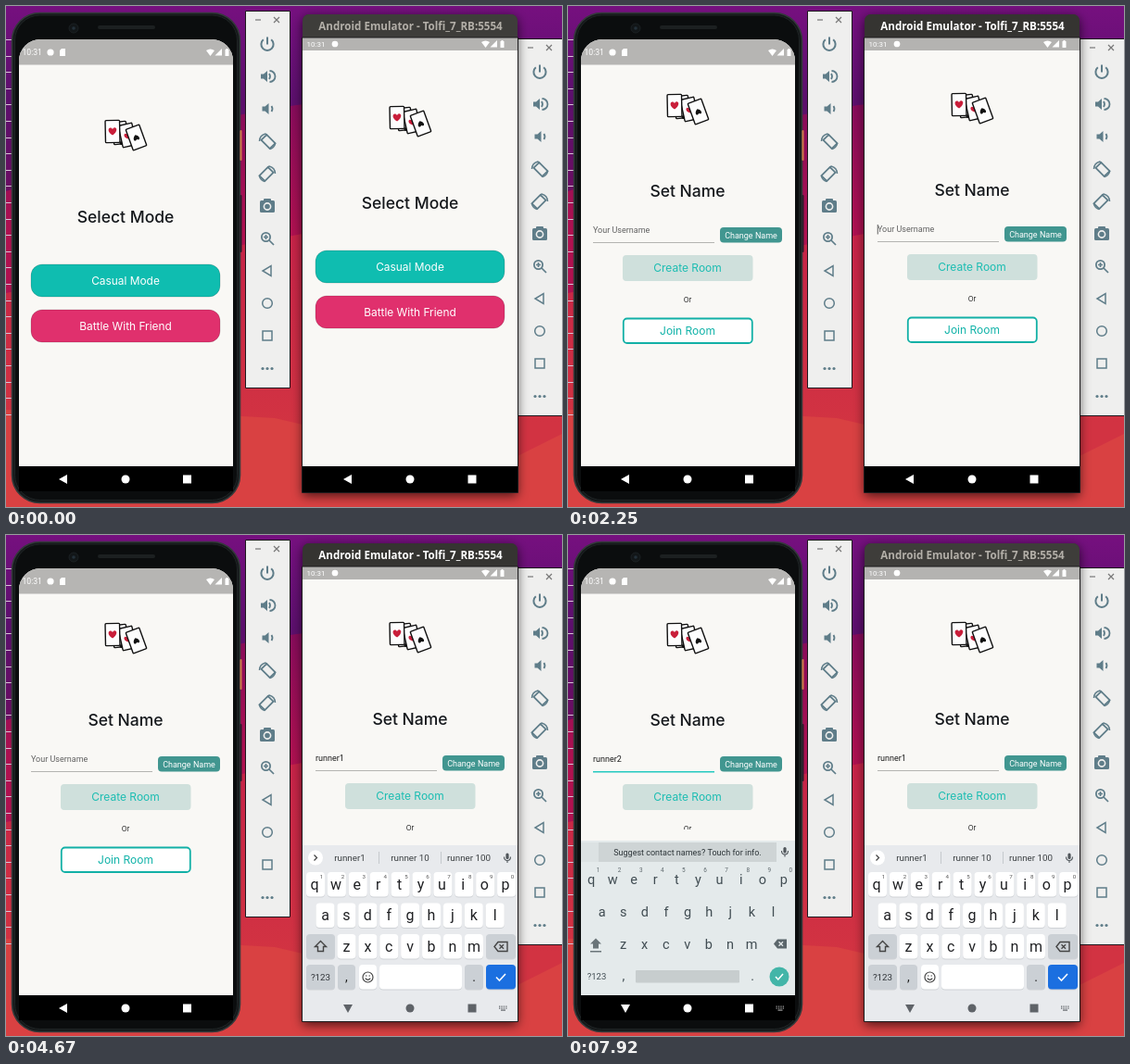
An HTML page with a canvas for the animation above (8 s loop, 600 px wide and 541 px high).

```html
<!DOCTYPE html>
<html lang="en">
<head>
<meta charset="utf-8">
<title>Card game on two emulators</title>
<style>
  html, body { margin: 0; width: 100%; height: 100%; overflow: hidden; background: #5d1070; }
  canvas { display: block; width: 100vw; height: 100vh; }
</style>
</head>
<body>
<canvas id="stage"></canvas>
<script>
const W = 600, H = 541, LOOP = 8000, STEP = 1000 / 12;
const canvas = document.getElementById('stage');
const c = canvas.getContext('2d');
const TEAL = '#0fbdb0', SLATE = '#5f7d89', PAGE = '#f9f8f5';
const DISPLAY = 'Inter, sans-serif', BODY = 'Roboto, sans-serif';
const ROWS = ['qwertyuiop', 'asdfghjkl', 'zxcvbnm'];

const clamp = v => Math.max(0, Math.min(1, v));
const between = (t, a, b) => t >= a && t < b;

// Cubic Bezier easing, solved by bisection.
function bezier(x1, y1, x2, y2) {
  const at = (a, b, s) => 3 * (1 - s) ** 2 * s * a + 3 * (1 - s) * s * s * b + s ** 3;
  return x => {
    if (x <= 0 || x >= 1) return clamp(x);
    let lo = 0, hi = 1;
    for (let i = 0; i < 24; i++) {
      const mid = (lo + hi) / 2;
      if (at(x1, x2, mid) < x) lo = mid; else hi = mid;
    }
    return at(y1, y2, lo);
  };
}
const easePage = bezier(0.35, 0.91, 0.33, 0.97);
const easeOut = bezier(0, 0, 0.2, 1);

function rect(x, y, w, h, fill, r = 0, stroke, lw = 1) {
  c.beginPath();
  c.roundRect(x, y, w, h, r);
  if (fill) { c.fillStyle = fill; c.fill(); }
  if (stroke) { c.strokeStyle = stroke; c.lineWidth = lw; c.stroke(); }
}
function disc(x, y, r, fill, stroke, lw = 1) {
  c.beginPath();
  c.arc(x, y, r, 0, 7);
  if (fill) { c.fillStyle = fill; c.fill(); }
  if (stroke) { c.strokeStyle = stroke; c.lineWidth = lw; c.stroke(); }
}
function text(s, x, y, size, color, { font = BODY, weight = 400, align = 'center' } = {}) {
  c.font = `${weight} ${size}px ${font}`;
  c.textAlign = align;
  c.fillStyle = color;
  c.fillText(s, x, y);
}
function at(x, y, draw, angle = 0) {
  c.save();
  c.translate(x, y);
  c.rotate(angle);
  draw();
  c.restore();
}
function clipped(x, y, w, h, draw, r = 0) {
  c.save();
  c.beginPath();
  c.roundRect(x, y, w, h, r);
  c.clip();
  draw();
  c.restore();
}
// Path centred on (x, y); stroked when a line width is given.
function icon(d, x, y, color, lw, angle = 0) {
  at(x, y, () => {
    const p = new Path2D(d);
    if (lw) { c.strokeStyle = color; c.lineWidth = lw; c.stroke(p); }
    else { c.fillStyle = color; c.fill(p); }
  }, angle);
}
function poly(points, fill) {
  c.beginPath();
  points.forEach(([x, y]) => c.lineTo(x, y));
  c.fillStyle = fill;
  c.fill();
}
function gradient(y0, y1, ...colors) {
  const g = c.createLinearGradient(0, y0, 0, y1);
  colors.forEach((color, i) => g.addColorStop(i / (colors.length - 1), color));
  return g;
}

function drawBackground() {
  rect(0, 0, W, H, gradient(0, 200, '#76107f', '#5c0f6d', '#6a0d62'));
  poly([[0, 200], [250, 118], [313, 107], [W, 80], [W, H], [0, H]],
    gradient(105, 250, '#860b5b', '#b01150'));
  poly([[0, 310], [255, 258], [320, 246], [W, 230], [W, H], [0, H]],
    gradient(250, 450, '#c62348', '#d23342'));
  poly([[0, 436], [255, 443], [290, 445], [320, 452], [540, 492], [W, 462], [W, H], [0, H]], '#d94142');
  c.fillStyle = '#d8c6d8';
  for (let y = 36; y < 445; y += 17.6) c.fillRect(0, Math.round(y), 7, 1);
}

function drawToolbar(x, y) {
  at(x, y, () => {
    rect(0.5, 0.5, 48, 407, '#efefee', 0, '#1d171d');
    icon('M-3 0H3', 14, 10, '#777', 1.2);
    icon('M-3-3L3 3M3-3L-3 3', 34, 10, '#777', 1.2);
    const X = 24;
    icon('M0-8V0M-4.2-5.2A6.6 6.6 0 1 0 4.2-5.2', X, 36.5, SLATE, 2);
    const speaker = 'M-7-2.5H-4L0-6V6L-4 2.5H-7Z';
    icon(speaker, X, 71, SLATE);
    icon('M2-3Q4 0 2 3M2.5-6A6 6 0 0 1 2.5 6', X, 71, SLATE, 1.8);
    icon(speaker, X + 1.5, 106, SLATE);
    icon('M3-3Q5 0 3 3', X + 1.5, 106, SLATE, 1.8);
    for (const [yy, s] of [[141, 1], [176, -1]]) {
      at(X, yy, () => {
        c.scale(s, 1);
        icon('M-4.2-6.5H4.2V6.5H-4.2Z', 1, 0.5, SLATE, 1.8, -Math.PI / 4);
        icon('M-8.5 0A8.5 8.5 0 0 1-2-8L0-6', 0, 0, SLATE, 1.5);
        icon('M8.5 3A8.5 8.5 0 0 1 3 8.5', 0, 0, SLATE, 1.5);
      });
    }
    rect(X - 8, 205, 16, 13, SLATE, 1.5);
    rect(X - 4, 203, 8, 4, SLATE, 1);
    disc(X, 211.5, 3.6, null, '#efefee', 1.6);
    disc(X - 1.5, 244.5, 4.6, null, SLATE, 1.8);
    icon('M2 2L7 7M-4-1.5H1M-1.5-4V1', X, 246, SLATE, 1.7);
    icon('M4-5.5V5.5L-5 0Z', X, 281, SLATE, 1.5);
    disc(X, 316, 5.3, null, SLATE, 1.5);
    rect(X - 5, 346, 10, 10, null, 0, SLATE, 1.5);
    for (const d of [-5, 0, 5]) disc(X + d, 386.5, 1.6, SLATE);
  });
}

function drawPhoneBody() {
  rect(6.5, 7.5, 246, 529, '#15191a', 30, '#33393a', 1.6);
  rect(9.5, 10, 240, 523.5, '#0b0d0e', 27, '#1f2425', 1);
  disc(73, 24, 5, '#121618', '#1b2023', 1);
  disc(73, 24, 1.8, '#243039');
  rect(99, 21, 62, 4, '#1c2021', 2);
  rect(252.5, 134, 2, 33, '#cf7b4a', 1);
  rect(252.5, 204, 2, 62, '#2a1d2a', 1);
}

function drawStatus(x, y, right, size, sd) {
  text('10:31', x, y + 3, size, '#fff', { align: 'left' });
  disc(x + 30.5, y, size * 0.42, '#fff');
  if (sd) icon('M-1-4H3V4H-3V-2Z', x + 43.5, y, '#fff');
  icon('M0 4L-4.5-2Q0-5 4.5-2Z', right - 18, y, '#fff');
  icon('M3.5 3.5V-4L-4 3.5Z', right - 9, y, '#fff');
  rect(right - 2, y - 3, 4, 7, '#fff', 0.5);
  rect(right - 1, y - 4, 2, 1, '#fff');
}

const HEART = 'M0 4C-8-1-3-7 0-2.5C3-7 8-1 0 4Z';
const RED = '#c91e3a', INK = '#111';
function card(x, y, angle, w, color, size, dx = 0, dy = 0) {
  at(x, y, () => {
    rect(-w / 2, -12, w, 24, '#fdfdfd', 1, INK, 1.4);
    c.translate(dx, dy);
    c.scale(size, color === RED ? size : -size);
    icon(HEART, 0, 0, color);
  }, angle);
}
function drawCards(y) {
  at(0, y, () => {
    card(123, 137, -0.1, 15, INK, 0.8, 3, -4);
    disc(124.5, 148, 2, INK);
    card(131, 139.5, -0.22, 15, RED, 0.8, 0, 1);
    card(115, 135.5, -0.02, 15.5, RED, 1);
    card(140.5, 142, -0.35, 15.5, INK, 0.75);
  });
}

function selectPage() {
  drawCards(0);
  text('Select Mode', 129, 234, 17.5, '#15181c', { font: DISPLAY, weight: 500 });
  const button = (label, y, fill) => {
    rect(27, y, 204, 35, fill, 12, '#0003', 0.8);
    text(label, 129, y + 21.7, 11.9, '#fff', { font: DISPLAY });
  };
  button('Casual Mode', 279, TEAL);
  button('Battle With Friend', 328, '#e0306d');
}

function setNamePage({ value, focus, caret, caretColor }) {
  drawCards(-28);
  text('Set Name', 129, 206, 17.5, '#15181c', { font: DISPLAY, weight: 500 });
  text(value || 'Your Username', 27, 245, 9, value ? '#1c1c1c' : '#626262', { align: 'left' });
  if (caret) {
    const x = 27 + (value ? c.measureText(value).width + 1.5 : 0);
    rect(x - 0.3, 237, 1.2, 10.5, caretColor);
  }
  rect(27, 255, 131, focus ? 1.6 : 1, focus ? '#25c9c0' : '#b4b4b1');
  rect(164, 239, 67, 16.5, '#419690', 4);
  text('Change Name', 197.5, 250.5, 9, '#fff');
  rect(59, 269, 140.5, 28, '#cfe0dc', 4);
  text('Create Room', 129, 287.2, 12, '#1cbdb2', { font: DISPLAY });
  text('Or', 129, 319.8, 7.6, '#222', { font: DISPLAY });
  rect(59.8, 337.5, 139, 26.5, '#fff', 4, '#12b0a6', 1.8);
  text('Join Room', 129, 354.8, 12, '#12b3a9', { font: DISPLAY });
}

// Both pages in one viewport: the new one slides in over the old one.
function drawPages(view, p, dx, selectDy, setDy, state) {
  const [x, y, w, h] = view;
  clipped(x, y, w, h, () => {
    rect(x, y, w, h, PAGE);
    if (p < 1) at(dx - p * w / 3, selectDy, selectPage);
    if (p > 0) {
      const off = (1 - p) * w;
      rect(x + off, y, w, h, PAGE);
      at(dx + off, setDy, () => setNamePage(state));
    }
  });
}

function keyboardGlyph(x, y, color) {
  for (let i = 0; i < 8; i++) rect(x - 4.5 + (i % 4) * 2.4, y - 2.5 + (i > 3) * 2, 1.3, 1.2, color);
  rect(x - 2.5, y + 1.5, 5, 1.2, color);
}
function drawNav(xs, y, color, down, glyphX) {
  icon(down ? 'M-5-4H5L0 5Z' : 'M4-5V5L-5 0Z', xs[0], y, color);
  disc(xs[1], y, 4.5, color);
  rect(xs[2] - 4.5, y - 4.5, 9, 9, color);
  if (glyphX) keyboardGlyph(glyphX, y, color === '#fff' ? '#999' : color);
}
function mic(x, y) {
  rect(x - 1.6, y - 5, 3.2, 6.5, '#50565b', 1.6);
  icon('M-3.5-1Q-3.5 3 0 3Q3.5 3 3.5-1M0 3V5.5', x, y, '#50565b', 1.1);
}
const SHIFT = 'M0-6L6 0H3V5H-3V0H-6Z';
function backspace(x, y, fill, color) {
  icon('M-7 0L-3-5H7V5H-3Z', x, y, color, fill ? 0 : 1.4);
  icon('M-1.5-2.2L3 2.2M3-2.2L-1.5 2.2', x, y, fill || color, 1.3);
}

function rightStrip(words) {
  disc(334, 348.5, 8, '#fff');
  if (words) {
    icon('M-1.5-3L1.5 0L-1.5 3', 334, 348.5, '#444', 1.3);
    words.forEach((w, i) => text(w, [371, 436, 499.5][i], 352, 9.8, '#3c4043'));
    for (const x of [402, 469]) rect(x, 342, 1, 13, '#c5c9cd');
  } else {
    const ink = '#54595e';
    icon('M1.5-3L-1.5 0L1.5 3', 334, 348.5, '#444', 1.3);
    icon('M-4.5-4.5H4.5V1L1 4.5H-4.5ZM-2 0Q0 3 2 0', 365, 348.5, ink, 1.2);
    text('GIF', 398.5, 351.5, 8, ink, { weight: 700 });
    rect(428, 344.5, 8.5, 9, null, 1, ink, 1.2);
    rect(430.3, 342.8, 4, 3, ink);
    icon('M-2 0H2M-2 2H2', 432.2, 348.5, ink, 0.9);
    for (let i = 0; i < 4; i++) icon('M-5 0H5', 466, 348.5, ink, 2, i * Math.PI / 4);
    disc(466, 348.5, 3.8, ink);
    disc(466, 348.5, 1.8, '#e8eaed');
    rect(486, 342, 1, 13, '#c5c9cd');
    for (const d of [-4, 0, 4]) disc(507 + d, 348.5, 1.1, ink);
  }
  mic(541, 348.5);
}
function rightKeyboard(words) {
  rect(320, 335, 232, 170, '#e8eaed');
  rightStrip(words);
  const key = (x, y, w, fill = '#fff') => {
    rect(x, y + 1, w, 26.5, '#cfd2d6', 4);
    rect(x, y, w, 26.5, fill, 4);
  };
  ROWS.forEach((row, r) => [...row].forEach((ch, i) => {
    const x = [334, 344.5, 367.5][r] + 22.9 * i, y = 364 + 33.5 * r;
    key(x - 10, y, 20);
    text(ch, x - (r ? 0 : 1), y + 18.5, 16, '#202124');
    if (!r) text((i + 1) % 10, x + 6.5, y + 7, 6.2, '#555');
  }));
  const grey = '#cbd0d5';
  key(324, 431, 31, grey);
  icon(SHIFT, 339.5, 444.5, '#444', 1.4);
  key(518, 431, 32, grey);
  backspace(534, 444.5, null, '#444');
  key(324, 464, 31, grey);
  text('?123', 339.5, 481, 9.8, '#33373b');
  key(358, 464, 19, grey);
  text(',', 367.5, 482, 14, '#222');
  key(381, 464, 19);
  disc(390.5, 477.5, 5.5, null, '#444', 1.2);
  icon('M-2.8 1.2Q0 4.5 2.8 1.2M-2.5-1.5H-1M1-1.5H2.5', 390.5, 477.5, '#444', 1.2);
  key(403, 464, 89);
  key(495, 464, 20, grey);
  text('.', 505, 482, 14, '#222');
  key(518, 464, 32, '#1b6fe0');
  icon('M-5 0L-1.5 3.5L5-3.5', 534, 477.5, '#fff', 1.6);
}

function leftKeyboard() {
  const ink = '#414d53';
  rect(14, 330, 231, 168, '#e4eaeb');
  rect(33, 332, 192, 21, '#ced4d5');
  rect(14, 332, 19, 21, '#dce2e3');
  text('Suggest contact names? Touch for info.', 129, 346, 9, '#2c3438');
  mic(234, 342);
  ROWS.forEach((row, r) => [...row].forEach((ch, i) => {
    const x = [25, 36.7, 59.5][r] + 23.1 * i;
    text(ch, x, 377 + 35.2 * r, 14.5, ink);
    if (!r) text((i + 1) % 10, x + 7.5, 363.5, 6.4, '#5e686d');
  }));
  icon(SHIFT, 30, 441.5, '#6a7579');
  rect(24, 449, 12, 1.5, '#6a7579');
  backspace(229, 441.5, '#e4eaeb', '#5b666b');
  text('?123', 31, 480, 9.5, ink);
  text(',', 60, 481, 14, ink);
  rect(73, 470, 112, 13.5, '#c7cdce', 1);
  text('.', 199, 481, 14, ink);
  disc(228, 477, 10.5, '#43b5a8');
  icon('M-4 0L-1.2 3L4-3', 228, 477, '#fff', 1.5);
}

function typed(word, t, start, gap) {
  return word.slice(0, Math.max(0, Math.floor((t - start) / gap) + 1));
}

function drawLeft(t) {
  drawPhoneBody();
  const page = easePage((t - 1580) / 400);
  const kb = easeOut((t - 6320) / 250);
  const focus = t >= 6160;
  clipped(14, 36, 231, 488, () => {
    rect(14, 36, 231, 488, PAGE);
    drawPages([14, 63, 231, kb >= 1 ? 255 : 434], page, 0, 0, 0, {
      value: typed('runner2', t, 6830, 150),
      focus,
      caret: focus && between(t % 1000, 300, 800),
      caretColor: TEAL
    });
    rect(14, 36, 231, 27.5, '#b6b5b3');
    drawStatus(17.5, 50, 238.5, 8.6, true);
    if (kb > 0) at(0, (1 - kb) * 168, leftKeyboard);
    rect(14, 497, 231, 27, '#000');
    drawNav([62, 129, 195.5], 511, '#fff', kb > 0, focus && 229);
  }, [23, 23, 0, 0]);
}

function drawRight(t) {
  const active = between(t, 660, 1580) || between(t, 2160, 5990);
  c.save();
  c.shadowColor = '#000a';
  c.shadowBlur = 12;
  c.shadowOffsetY = 3;
  rect(320, 9, 232, 517, '#3a3936', [7, 7, 0, 0]);
  c.restore();
  rect(320, 9, 232, 25, active ? '#353431' : '#3e3d3a', [7, 7, 0, 0]);
  text('Android Emulator - Tolfi_7_RB:5554', 436.5, 25.5, 11.6, active ? '#fff' : '#b3afa8',
    { font: '"Open Sans", sans-serif', weight: 700 });

  const page = easePage((t - 660) / 400);
  const kb = easeOut((t - 2330) / 250);
  const value = typed('runner1', t, 3250, 170);
  drawPages([320, 48, 232, 449], page, 307, -15, -1, {
    value,
    focus: false,
    caret: t >= 2160 && between(t % 1000, 100, 600),
    caretColor: value ? TEAL : '#777'
  });
  rect(320, 34, 232, 14, '#b4b3b1');
  drawStatus(324.5, 41, 535.5, 8, false);

  let words = null;
  if (value.length === 7) words = ['runner1', 'runner 10', 'runner 100'];
  else if (value) words = [value, 'runner', 'running'];
  clipped(320, 48, 232, 450, () => {
    if (kb > 0) at(0, (1 - kb) * 163, () => rightKeyboard(words));
  });
  rect(320, 497, 232, 28.5, kb > 0 ? '#e8eaed' : '#000');
  drawNav([369, 436, 503], 511, kb > 0 ? '#5f6368' : '#fff', kb > 0, kb > 0 && 536.5);
  rect(319.5, 34, 233, 491.5, null, 0, '#1d1a1c', 1);
}

function draw(t) {
  drawBackground();
  drawToolbar(258, 5);
  drawLeft(t);
  drawToolbar(552, 35);
  drawRight(t);
}

function frame(now) {
  const dpr = window.devicePixelRatio || 1;
  const w = Math.round(innerWidth * dpr), h = Math.round(innerHeight * dpr);
  if (canvas.width !== w || canvas.height !== h) {
    canvas.width = w;
    canvas.height = h;
  }
  c.setTransform(w / W, 0, 0, h / H, 0, 0);
  draw(Math.floor(((now % LOOP) + 4) / STEP) * STEP % LOOP);
  requestAnimationFrame(frame);
}
requestAnimationFrame(frame);
</script>
</body>
</html>
```
